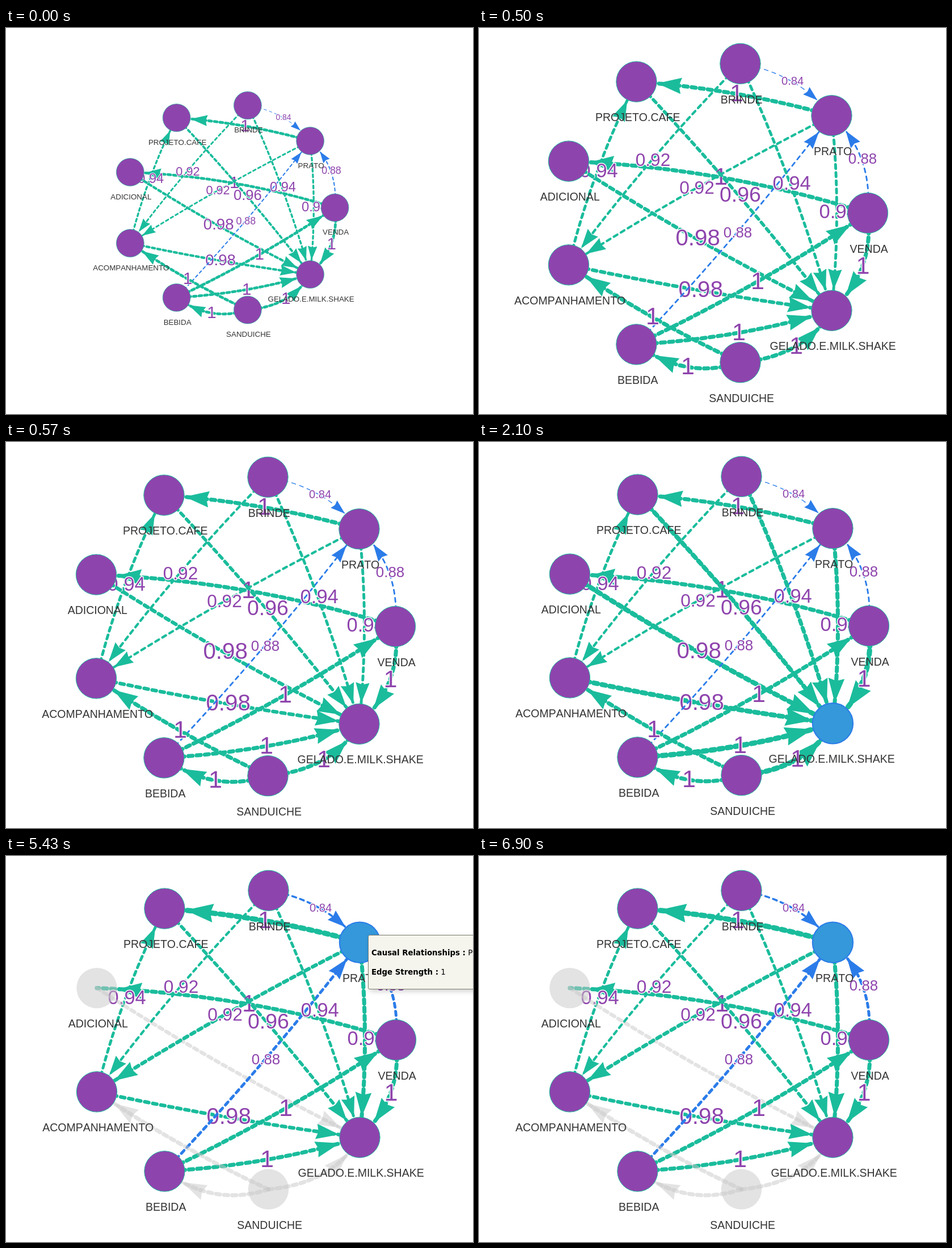
Animation, 823 px wide and 680 px high, one loop 8 s. Source, as an HTML page with a canvas:

```html
<!DOCTYPE html>
<html lang="pt">
<head>
<meta charset="utf-8">
<style>
  html, body { margin: 0; width: 100%; height: 100%; overflow: hidden; background: #fff; }
  #stage { position: absolute; left: 0; top: 0; width: 823px; height: 680px; overflow: hidden; contain: strict; }
  canvas { display: block; }
  #tip {
    position: absolute; left: 638px; top: 139px; width: 320px; height: 94px;
    border: 1px solid #808074; border-radius: 3px; background: #f5f4ed;
    box-shadow: 3px 3px 10px rgba(0, 0, 0, .2);
    font: 13.3px/16px "DejaVu Sans", sans-serif; color: #000; white-space: nowrap;
    visibility: hidden;
  }
  #tip p { position: absolute; left: 5px; margin: 0; }
</style>
</head>
<body>
<div id="stage">
  <canvas width="823" height="680"></canvas>
  <div id="tip">
    <p style="top:23px"><b>Causal Relationships :</b> PRATO</p>
    <p style="top:57px"><b>Edge Strength :</b> 1</p>
  </div>
</div>
<script>
const TEAL = '#1abc9c', BLUE = '#2b7ce9', PURPLE = '#8e44ad', FADED = 'rgba(200,200,200,0.5)';
const LOOP = 8000, UNIT = 1.44, RADIUS = 35.7;
const FONT = '"Liberation Sans", Arial, sans-serif';

// Clockwise around the ring from the rightmost point
const NAMES = ['VENDA', 'GELADO.E.MILK.SHAKE', 'SANDUICHE', 'BEBIDA', 'ACOMPANHAMENTO',
  'ADICIONAL', 'PROJETO.CAFE', 'BRINDE', 'PRATO'];
const [VENDA, GELADO, SANDUICHE, BEBIDA, ACOMP, ADICIONAL, PROJETO, BRINDE, PRATO] = NAMES.keys();
const CENTER = { x: 415.3, y: 324 };
const nodes = NAMES.map((name, i) => {
  const a = i * Math.PI * 2 / NAMES.length;
  return { name, x: CENTER.x + 271.7 * Math.cos(a), y: CENTER.y + 267.2 * Math.sin(a) };
});

// from, to, strength, midpoint of the curve
const EDGES = [
  [VENDA, ADICIONAL, 1, 427, 261],
  [VENDA, GELADO, 1, 677.5, 418],
  [VENDA, PRATO, .88, 676, 229],
  [ACOMP, GELADO, .98, 389.5, 460],
  [ACOMP, PROJETO, .94, 210.5, 250.5],
  [ADICIONAL, GELADO, .98, 384.5, 369],
  [BEBIDA, GELADO, 1, 459, 535],
  [BEBIDA, PRATO, .88, 456, 359],
  [BEBIDA, VENDA, 1, 492, 445],
  [BRINDE, ACOMP, .92, 306, 231.5],
  [BRINDE, GELADO, .94, 550.5, 272.5],
  [BRINDE, PRATO, .84, 553, 92],
  [PRATO, ACOMP, .92, 383.5, 281],
  [PRATO, GELADO, .94, 632.5, 323],
  [PRATO, PROJETO, 1, 455, 114],
  [PROJETO, GELADO, .96, 459.5, 293],
  [SANDUICHE, ACOMP, 1, 307, 507],
  [SANDUICHE, BEBIDA, 1, 369, 595],
  [SANDUICHE, GELADO, 1, 560, 559],
];

// Hard steps: start time, view offset, zoom, selected node, tooltip
const STEPS = [
  { at: 0, dx: -21.7, dy: -7.5, zoom: .6845 },
  { at: 500, dx: -2, dy: 2 },
  { at: 570, dx: -1, dy: 1 },
  { at: 900, dx: 0, dy: 1 },
  { at: 970 },
  { at: 2100, selected: GELADO },
  { at: 5430, selected: PRATO, tip: true },
  { at: 6900, selected: PRATO },
];

const ctx = document.querySelector('canvas').getContext('2d');
const tip = document.getElementById('tip');

const isFaded = (node, selected) =>
  selected === PRATO && (node === ADICIONAL || node === SANDUICHE);

function curvePoint(a, c, b, t) {
  const u = 1 - t;
  return {
    x: u * u * a.x + 2 * u * t * c.x + t * t * b.x,
    y: u * u * a.y + 2 * u * t * c.y + t * t * b.y,
  };
}

function drawArrow(a, c, b, length) {
  let lo = .4, hi = 1;
  for (let i = 0; i < 20; i++) {
    const mid = (lo + hi) / 2, p = curvePoint(a, c, b, mid);
    if (Math.hypot(p.x - b.x, p.y - b.y) > RADIUS + 1) lo = mid; else hi = mid;
  }
  const end = curvePoint(a, c, b, lo), guide = curvePoint(a, c, b, lo - .1);
  ctx.save();
  ctx.translate(end.x, end.y);
  ctx.rotate(Math.atan2(end.y - guide.y, end.x - guide.x));
  ctx.beginPath();
  ctx.moveTo(0, 0);
  ctx.lineTo(-length, length / 3);
  ctx.lineTo(-.9 * length, 0);
  ctx.lineTo(-length, -length / 3);
  ctx.fill();
  ctx.restore();
}

function drawStrength(text, x, y, size) {
  ctx.font = `${size}px ${FONT}`;
  ctx.lineWidth = 2 * UNIT;
  ctx.lineJoin = 'round';
  ctx.strokeStyle = '#fff';
  ctx.fillStyle = PURPLE;
  // Text sits slightly right of and below its anchor
  x += .04 * ctx.measureText(text).width;
  y += .02 * size;
  ctx.strokeText(text, x, y);
  ctx.fillText(text, x, y);
}

function drawEdge([from, to, strength, x, y], selected) {
  const a = nodes[from], b = nodes[to];
  const c = { x: 2 * x - (a.x + b.x) / 2, y: 2 * y - (a.y + b.y) / 2 };
  const faded = isFaded(from, selected);
  const rank = (strength - .84) / .16;
  const width = 1 + 3.9 * rank + (from === selected || to === selected ? 1.5 : 0);

  ctx.strokeStyle = ctx.fillStyle = faded ? FADED : strength < .9 ? BLUE : TEAL;
  ctx.lineWidth = width * UNIT;
  ctx.lineCap = 'round';
  ctx.setLineDash([5 * UNIT, 5 * UNIT]);
  ctx.beginPath();
  ctx.moveTo(a.x, a.y);
  ctx.quadraticCurveTo(c.x, c.y, b.x, b.y);
  ctx.stroke();
  ctx.setLineDash([]);
  drawArrow(a, c, b, (15 + 3 * width) * UNIT);
  if (!faded) drawStrength(strength, x, y, (14 + 16 * rank) * UNIT);
}

function drawNode(node, i, selected) {
  const active = i === selected, faded = isFaded(i, selected);
  ctx.beginPath();
  ctx.arc(node.x, node.y, RADIUS, 0, Math.PI * 2);
  ctx.fillStyle = faded ? FADED : active ? '#3498db' : PURPLE;
  ctx.fill();
  if (!faded) {
    ctx.lineWidth = active ? 2 : 1;
    ctx.strokeStyle = active ? BLUE : TEAL;
    ctx.stroke();
  }
  const shift = !active ? 2.2 : i === GELADO ? -1.8 : 3.2;
  ctx.font = `19.5px ${FONT}`;
  ctx.fillStyle = '#343434';
  ctx.fillText(node.name, node.x + shift, node.y + 64.3);
}

function draw({ dx = 0, dy = 0, zoom = 1, selected = -1, tip: showTip }) {
  ctx.setTransform(1, 0, 0, 1, 0, 0);
  ctx.clearRect(0, 0, 823, 680);
  ctx.translate(CENTER.x + dx, CENTER.y + dy);
  ctx.scale(zoom, zoom);
  ctx.translate(-CENTER.x, -CENTER.y);
  ctx.textAlign = 'center';
  ctx.textBaseline = 'middle';
  ctx.fontKerning = 'none';
  EDGES.forEach(edge => drawEdge(edge, selected));
  nodes.forEach((node, i) => drawNode(node, i, selected));
  tip.style.visibility = showTip ? 'visible' : 'hidden';
}

const start = performance.now();
let shown;
function tick() {
  const t = (performance.now() - start) % LOOP;
  const step = STEPS.findLast(s => s.at <= t) || STEPS[0];
  if (step !== shown) draw(shown = step);
  requestAnimationFrame(tick);
}
tick();
</script>
</body>
</html>
```
